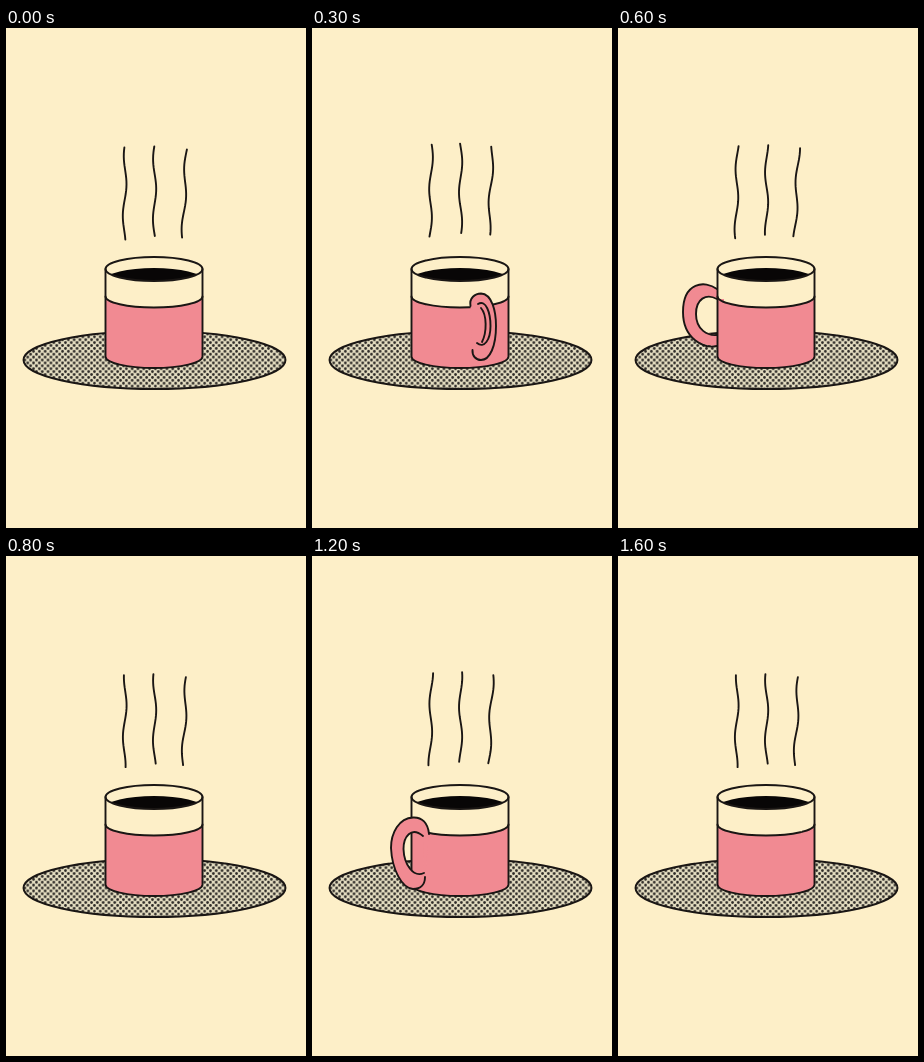
An HTML page for the animation above (1700 ms loop, 300x500 px).

```html
<!DOCTYPE html>
<html lang="en">
<head>
<meta charset="utf-8">
<title>Coffee cup</title>
<style>
  html, body { margin: 0; width: 100%; height: 100%; overflow: hidden; background: #fdefc8; }
  svg { display: block; width: 100vw; height: 100vh; }
  .line { fill: none; stroke: #1a1614; stroke-width: 1.9; stroke-linecap: round; stroke-linejoin: round; }
  .pink { fill: #f18a92; fill-rule: evenodd; }
  .cream { fill: #fdefc8; }
</style>
</head>
<body>
<svg viewBox="0 0 300 500">
  <defs>
    <pattern id="dots" width="5.8" height="5.8" patternUnits="userSpaceOnUse">
      <rect width="5.8" height="5.8" fill="#e3dcc0"/>
      <circle cx="1.45" cy="1.45" r="1.35" fill="#2b2825"/>
      <circle cx="4.35" cy="4.35" r="1.35" fill="#2b2825"/>
    </pattern>
    <clipPath id="rim"><ellipse cx="148" cy="241" rx="48.5" ry="12"/></clipPath>
  </defs>

  <ellipse class="line" cx="148.5" cy="332" rx="131" ry="29" style="fill: url(#dots)"/>

  <g id="back"></g>

  <path class="cream" d="M99.5 241A48.5 12 0 0 1 196.5 241V271H99.5Z"/>
  <path class="pink" d="M99.5 268.5A48.5 11 0 0 0 196.5 268.5V328.5A48.5 11.5 0 0 1 99.5 328.5Z"/>
  <ellipse cx="148" cy="252" rx="48.5" ry="12" fill="#080606" clip-path="url(#rim)"/>
  <g class="line">
    <ellipse cx="148" cy="241" rx="48.5" ry="12"/>
    <path d="M99.5 268.5A48.5 11 0 0 0 196.5 268.5"/>
    <path d="M99.5 241V328.5A48.5 11.5 0 0 0 196.5 328.5V241"/>
  </g>

  <g id="front"></g>
  <g class="line" id="steam"></g>
</svg>

<script>
const $ = id => document.getElementById(id);

// Handle poses by angle from the viewer, drawn for the right side
const poses = {
  20: {
    fill: 'M158.5 278C157 270 163 265.5 169 265.5C180 266 184 283 184 298C184 318 178 332 169 332C164 332 160 328 160.5 322Z',
    lines: 'M158.5 278C157 270 163 265.5 169 265.5C180 266 184 283 184 298C184 318 178 332 169 332C164 332 160 328 160.5 322' +
           'M166 276C174 271 178.5 285 178.5 298C178.5 312 172 321 165 315M169 280C175 287 175 304 170 314'
  },
  60: {
    fill: 'M179 278C180 267 186 261 195 261.5C209 262 217 277 217 292C216 314 206 332 195 333C188 333 183 329 183 321Z' +
          'M185 280C197 270 204.5 281 204.5 293C204 308 195 322 184 317Z',
    lines: 'M179 278C180 267 186 261 195 261.5C209 262 217 277 217 292C216 314 206 332 195 333C188 333 183 329 183 321' +
           'M185 280C197 270 204.5 281 204.5 293C204 308 195 322 184 317'
  },
  100: {
    fill: 'M190 268C200 252 231 250 231 284C231 311 210 321 190 317ZM190 274C206 263 218 270 218 286C218 302 206 309 190 306Z',
    lines: 'M197 261C209 252 231 254 231 284C231 311 210 321 197 318M197 271C208 265 218 271 218 286C218 302 206 308 197 307'
  }
};

function handle(step) {
  const angle = 180 - step * 40;
  const pose = poses[Math.abs(angle)];
  $('front').innerHTML = $('back').innerHTML = '';
  if (!pose) return;
  const flip = angle < 0 ? ' transform="matrix(-1 0 0 1 296 0)"' : '';
  $(Math.abs(angle) > 90 ? 'back' : 'front').innerHTML =
    `<g${flip}><path class="pink" d="${pose.fill}"/><path class="line" d="${pose.lines}"/></g>`;
}

// Each wisp: top x, bottom x, top y, bottom y, y of a crest
const wisps = [[119.5, 118, 118, 210, 157], [148.7, 148.5, 117, 206.5, 161], [180.5, 176.8, 120, 208, 169]];
const waveLength = 60;

function wisp([x0, x1, y0, y1, crest], step) {
  const turn = 2 * Math.PI * step / 9;
  const bob = 1.5 * Math.cos(turn);
  const points = [];
  for (let i = 0; i <= 30; i++) {
    const k = i / 30, y = y0 + (y1 - y0) * k + bob;
    const phase = 2 * Math.PI * (y - crest) / waveLength + turn;
    points.push(`${(x0 + (x1 - x0) * k + 1.6 * Math.cos(phase)).toFixed(2)} ${y.toFixed(2)}`);
  }
  return `<path d="M${points.join('L')}"/>`;
}

let shown = -1;
const start = performance.now();

function draw(now) {
  const tick = Math.floor(Math.max(0, now - start) % 1700 / 100);
  // Nine poses per turn at twelve per second, shown at ten per second
  const step = Math.floor(tick * 1.2 + 0.7) % 9;
  if (step !== shown) {
    shown = step;
    handle(step);
    $('steam').innerHTML = wisps.map(w => wisp(w, step)).join('');
  }
  requestAnimationFrame(draw);
}
draw(start);
</script>
</body>
</html>
```
